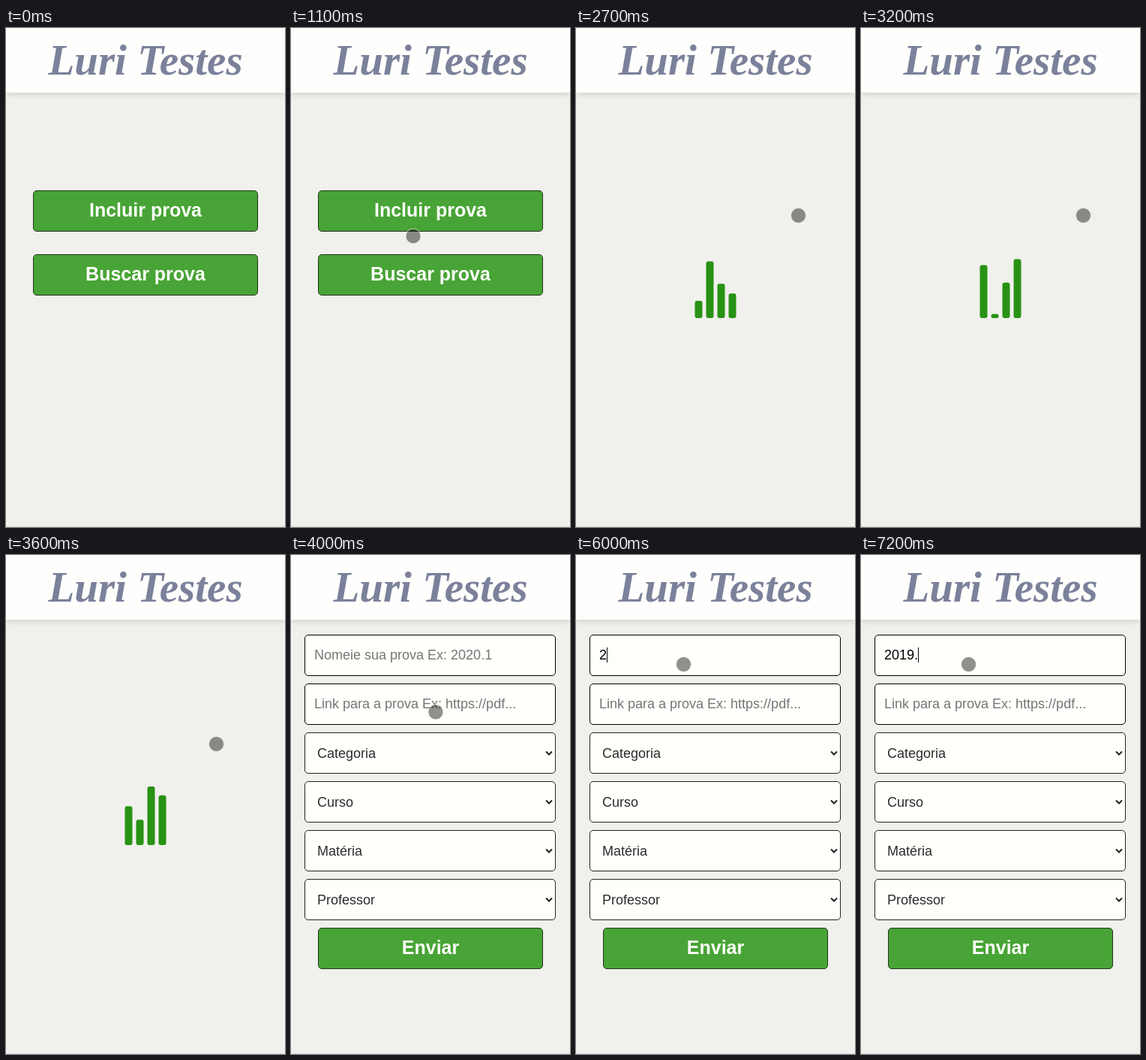
An HTML page that plays this animation: 372 by 664 pixels, repeating every 8000 ms.

```html
<!DOCTYPE html>
<html lang="pt">
<head>
<meta charset="utf-8">
<style>
html, body { margin: 0; width: 100%; height: 100%; overflow: hidden; background: #f0f0ec; }
body { position: relative; font: 18px "Liberation Sans", Arial, sans-serif; }
body *, svg { position: absolute; box-sizing: border-box; white-space: pre; }
header {
  left: 0; top: 0; width: 372px; height: 86px; background: #fefefc;
  box-shadow: 0 2px 8px rgba(0, 0, 0, .14); color: #7b819a; text-align: center;
  font: italic bold 57px/86px "Liberation Serif", "Times New Roman", serif;
}
footer { left: 0; top: 663px; width: 372px; height: 1px; background: #dededc; }
.button, .field { height: 55px; border: 1px solid #222; border-radius: 5px; line-height: 53px; }
.button {
  left: 36px; width: 300px; background: #48a436; border-color: #24331f;
  color: #fffffc; font-weight: bold; font-size: 25px; line-height: 51px; text-align: center;
}
.field { left: 18px; width: 335px; padding-left: 12px; background: #fffffc; border-color: #000; color: #757575; }
.select { padding-left: 16px; line-height: 54px; color: #2b2b2b; border-color: #222; }
.select svg { left: 319px; top: 22px; }
#caret { top: 123px; width: 1px; height: 20px; background: #000; }
svg { left: 0; top: 0; overflow: visible; }
#loader { fill: #289214; }
#dot { fill: rgba(20, 20, 16, .47); stroke: rgba(255, 255, 255, .65); }
#dot.pressed { fill: rgba(10, 14, 10, .6); stroke: rgba(255, 255, 255, .55); stroke-width: 2; }
</style>
</head>
<body>
<header>Luri Testes</header>
<div id="home">
  <div class="button" style="top:216px">Incluir prova</div>
  <div class="button" style="top:301px">Buscar prova</div>
</div>
<svg id="loader" width="372" height="664"></svg>
<div id="form">
  <div class="field" id="name" style="top:106px"></div>
  <div class="field" style="top:171px">Link para a prova Ex: https://pdf...</div>
  <div class="button" style="top:496px">Enviar</div>
  <div id="caret"></div>
</div>
<footer></footer>
<svg width="372" height="664"><circle id="dot" r="10"/></svg>
<script>
const LOOP = 8000, TICK = 100;
const ENTER = 700, PRESS = 2000, RELEASE = 2200, LOAD = 2700, READY = 3800, FOCUS = 4700;
const $ = id => document.getElementById(id);
const home = $('home'), loader = $('loader'), form = $('form'), nameField = $('name');
const caret = $('caret'), dot = $('dot');

['Categoria', 'Curso', 'Matéria', 'Professor'].forEach((label, i) => {
  form.insertAdjacentHTML('beforeend',
    `<div class="field select" style="top:${236 + 65 * i}px">${label}<svg width="12" height="10">` +
    '<path d="M2 2.5l4 4 4-4" fill="none" stroke="#222" stroke-width="2"/></svg></div>');
});

// Each bar runs in straight lines between a few heights, one per step
const bars = [
  { step: 645, heights: [20, 80, 20] },
  { step: 182, heights: [80, 55, 33, 5, 75, 23, 73] },
  { step: 127, heights: [50, 34, 78, 23, 56, 23, 34, 76, 80, 54] },
  { step: 182, heights: [30, 45, 13, 80, 56, 72, 45] }
];
loader.innerHTML = bars.map((_, i) => `<rect x="${158.5 + 15 * i}" width="10" rx="3"/>`).join('');

// Pointer strokes, each leaving from where the last one ended
const origin = { x: 51, y: 291 };
const strokes = [
  { from: 700, to: 1100, x: 163, y: 277 },
  { from: 1200, to: 1600, x: 201.5, y: 250.5 },
  { from: 2100, to: 2300, x: 296.5, y: 249.5 },
  { from: 3500, to: 3600, x: 280.5, y: 251.5 },
  { from: 3600, to: 4100, x: 171, y: 192 },
  { from: 4200, to: 4400, x: 143.5, y: 145.5 }
];
const keyTimes = [6000, 6100, 6600, 6800, 7200];

const show = (el, on) => { el.style.display = on ? '' : 'none'; };
const set = (el, attrs) => { for (const k in attrs) el.setAttribute(k, attrs[k]); };
const mix = (a, b, p) => a + (b - a) * p;

function barHeight({ step, heights }, ms) {
  const i = Math.floor(ms / step);
  return mix(heights[i], heights[i + 1], ms / step - i);
}

// Strokes curve: sideways at an even pace, vertically with a slow start
function pointerAt(t) {
  return strokes.reduce((at, s) => {
    const p = Math.min(1, Math.max(0, (t - s.from) / (s.to - s.from)));
    return { x: mix(at.x, s.x, p), y: mix(at.y, s.y, p ** 1.5) };
  }, origin);
}

function draw(t) {
  const loading = t >= LOAD && t < READY;
  show(home, t < LOAD);
  show(loader, loading);
  show(form, t >= READY);

  if (loading) bars.forEach((bar, i) => {
    const height = barHeight(bar, 33 + (t - LOAD) * 1.018);
    set(loader.children[i], { y: 386 - height, height });
  });

  const typed = '2019.'.slice(0, keyTimes.filter(k => t >= k).length);
  nameField.textContent = typed || 'Nomeie sua prova Ex: 2020.1';
  nameField.style.color = typed ? '#000' : '';
  show(caret, t >= FOCUS);
  caret.style.left = 31 + 10 * typed.length - (typed.endsWith('.') ? 5 : 0) + 'px';

  const { x, y } = pointerAt(t);
  show(dot, t >= ENTER);
  set(dot, { cx: x, cy: y });
  dot.classList.toggle('pressed', t >= PRESS && t < RELEASE);
}

const start = performance.now();
function frame() {
  const t = (performance.now() - start) % LOOP;
  draw(t - t % TICK);
  requestAnimationFrame(frame);
}
frame();
</script>
</body>
</html>
```
